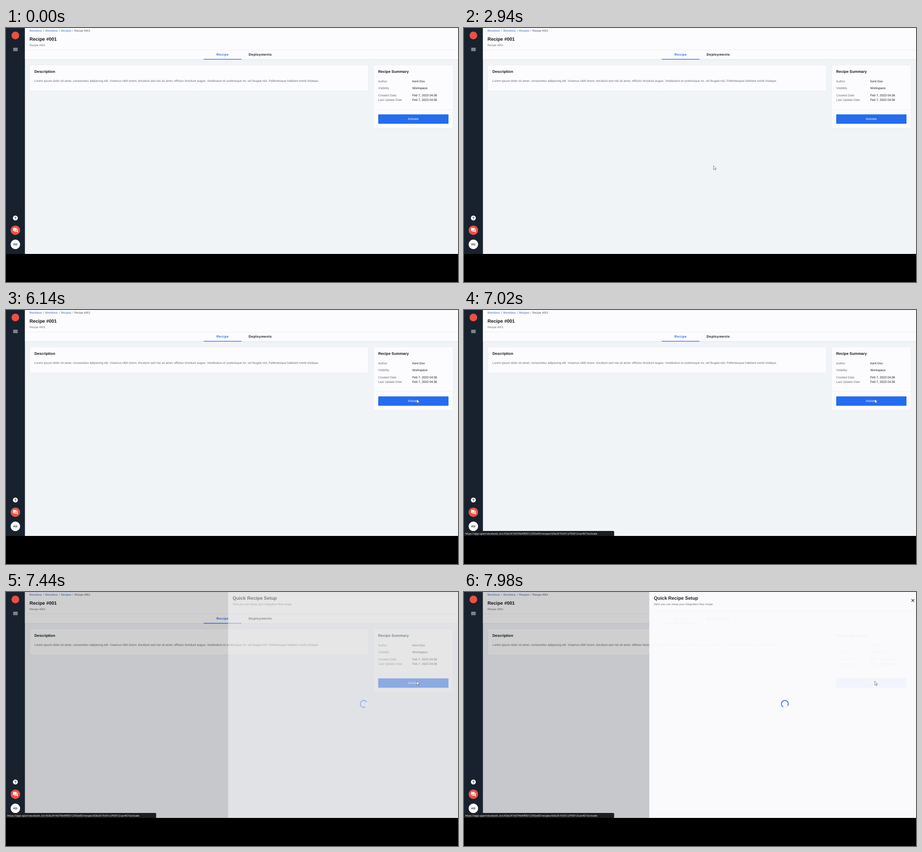
Animation, 998 px wide and 561 px high, one loop 8000 ms. Source, as an HTML page with a canvas:

```html
<!DOCTYPE html>
<html lang="en">
<head>
<meta charset="utf-8">
<title>Recipe activation</title>
<style>
html, body { margin: 0; width: 100%; height: 100%; overflow: hidden; background: #000; }
canvas { display: block; }
</style>
</head>
<body>
<canvas id="stage" width="998" height="561"></canvas>
<script>
const ctx = document.getElementById('stage').getContext('2d');
const LOOP = 8000;
const SANS = '"Liberation Sans", Arial, sans-serif';
const UI = '"Open Sans", "Noto Sans", sans-serif';
// The page is laid out in CSS pixels and shown at this scale.
const U = 0.52;
const BLUE = '#246df0', LINK = '#2d63d2', RED = '#ee4f43', INK = '#15171c', GREY = '#666a71';
const SIDE = '#18222f', CARD = '#fcfcfe';

const STATUS_AT = 6420, DRAWER_AT = 7275;
const URL_TEXT = 'https://app-sparrow.elastic.io/c/63e2419d74b49f0012392e05/recipes/63e261fc651a790012cac467/activate';
const LOREM = 'Lorem ipsum dolor sit amet, consectetur adipiscing elit. Vivamus nibh lorem, tincidunt sed nisi sit amet, ' +
  'efficitur tincidunt augue. Vestibulum et scelerisque mi, vel feugiat nisl. Pellentesque habitant morbi tristique.';

// Pointer keys: time, x, y
const POINTER = [
  [980, 2, 356], [1300, 260, 322], [1560, 430, 300], [1740, 469, 306], [2240, 551, 304],
  [2950, 551, 304], [3340, 700, 240], [3700, 799, 159], [4100, 650, 90], [4450, 537, 53],
  [4640, 540, 58], [4860, 800, 150], [5020, 899, 182], [5300, 909, 197], [5600, 914, 192],
  [5900, 899, 199], [6160, 907, 197]
];

const ARROW = new Path2D('M0 0V17L4 13L6.6 19L9 18L6.5 12.2H12Z');
const FORUM = new Path2D('M21 6h-2v9H6v2c0 .55.45 1 1 1h11l4 4V7c0-.55-.45-1-1-1z' +
  'M17 12V3c0-.55-.45-1-1-1H3c-.55 0-1 .45-1 1v14l4-4h10c.55 0 1-.45 1-1z');

const clamp = (v) => Math.min(1, Math.max(0, v));

function rect(x, y, w, h, color) {
  ctx.fillStyle = color;
  ctx.fillRect(x, y, w, h);
}

function circle(x, y, r, color) {
  ctx.fillStyle = color;
  ctx.beginPath();
  ctx.arc(x, y, r, 0, Math.PI * 2);
  ctx.fill();
}

function text(str, x, y, px, color, { bold = false, align = 'left', spacing = 0, family = SANS } = {}) {
  ctx.font = `${bold ? 'bold ' : ''}${px * U}px ${family}`;
  ctx.textRendering = 'geometricPrecision';
  ctx.letterSpacing = `${spacing * U}px`;
  ctx.textAlign = align;
  ctx.fillStyle = color;
  ctx.fillText(str, x, y);
}

function card(x, y, w, h) {
  ctx.beginPath();
  ctx.roundRect(x + 0.5, y + 0.5, w - 1, h - 1, 1.5);
  ctx.fillStyle = CARD;
  ctx.fill();
  ctx.strokeStyle = '#ebecf5';
  ctx.lineWidth = 1;
  ctx.stroke();
}

function drawHeader() {
  rect(41.5, 0, 956.5, 69.5, CARD);
  rect(41.5, 0, 956.5, 0.6, '#e9e9f0');
  rect(41.5, 48, 956.5, 0.8, '#e9ebef');
  rect(41.5, 69.3, 956.5, 0.9, '#dce0e5');
  [['Brendova', 52], ['Brendova', 87], ['Recipes', 121.5]].forEach(([s, x]) => text(s, x, 8.3, 12, LINK));
  [82.2, 117, 146.2].forEach((x) => text('/', x, 8.3, 12, GREY));
  text('Recipe #001', 151, 8.3, 12, '#4d5158');
  text('Recipe #001', 52, 28, 20, INK, { bold: true });
  text('Recipe #001', 52, 39.5, 12, GREY);
  text('Recipe', 464.8, 61.2, 14, BLUE, { bold: true, spacing: 1 });
  text('Deployments', 535.8, 61.2, 14, INK, { bold: true, spacing: 1 });
  rect(436.5, 68.4, 83.2, 1.3, BLUE);
}

function drawCards() {
  card(52, 81, 748.5, 58.5);
  text('Description', 62.8, 99.4, 16, INK, { bold: true });
  text(LOREM, 62.8, 119, 13, GREY);

  card(811, 81, 176.5, 141);
  text('Recipe Summary', 821.8, 99.4, 16, INK, { bold: true });
  const rows = [
    ['Author', 'Kent Dov', 119.5], ['Visibility', 'Workspace', 135.2],
    ['Created Date', 'Feb 7, 2023 04:36', 150.7], ['Last Update Date', 'Feb 7, 2023 04:36', 161.2]
  ];
  rows.forEach(([label, value, y]) => {
    text(label, 821.8, y, 13, GREY);
    text(value, 897, y, 13, INK);
  });
  rect(812, 179.8, 175, 0.8, '#e9ebef');
  ctx.fillStyle = BLUE;
  ctx.beginPath();
  ctx.roundRect(821.8, 190.7, 155.2, 20.8, 1);
  ctx.fill();
  text('Activate', 899.2, 203.4, 13, '#fff', { align: 'center' });
}

function drawSidebar() {
  rect(0, 0, 41.5, 499, SIDE);
  circle(20.7, 16.5, 8.5, RED);
  [44.2, 46.8, 49.4].forEach((y) => rect(15.8, y, 10, 1.1, '#fff'));
  circle(20.7, 419.6, 5.4, '#fff');
  text('?', 20.7, 422.6, 16, SIDE, { bold: true, align: 'center' });
  circle(20.7, 446.7, 10.5, RED);
  ctx.save();
  ctx.translate(14.5, 440.5);
  ctx.scale(U, U);
  ctx.fillStyle = '#fff';
  ctx.fill(FORUM);
  ctx.restore();
  circle(20.7, 477.8, 10.5, '#fff');
  text('KD', 20.7, 480.1, 12, '#22262d', { bold: true, align: 'center' });
}

function drawSpinner(x, y, t) {
  const gap = (15 + (t - 7440) * 0.11) * Math.PI / 180;
  ctx.lineWidth = 2;
  ctx.strokeStyle = '#eef2fb';
  ctx.beginPath();
  ctx.arc(x, y, 7.6, 0, Math.PI * 2);
  ctx.stroke();
  ctx.strokeStyle = '#3a70e4';
  ctx.beginPath();
  ctx.arc(x, y, 7.6, gap + 0.75, gap + Math.PI * 2 - 0.75);
  ctx.stroke();
}

function drawDrawer(t) {
  const mask = clamp((t - 7240) / 180);
  if (!mask) return;
  rect(41.5, 0, 956.5, 499, `rgba(0,0,0,${0.18 * mask})`);
  if (t < DRAWER_AT) return;

  const rest = Math.exp((DRAWER_AT - t) / 245);
  const x = 399 + 180 * rest;
  ctx.save();
  ctx.globalAlpha = 1 - rest;
  rect(x, 0, 998 - x, 499, '#fdfdff');
  rect(x, 41.5, 998 - x, 0.8, '#eeeff4');
  text('Quick Recipe Setup', x + 10.2, 17.3, 20, INK, { bold: true });
  text('Here you can setup your integration flow recipe', x + 10.2, 28.7, 12, GREY);
  drawSpinner(x + 299.3, 247.2, t);
  ctx.strokeStyle = INK;
  ctx.lineWidth = 1.2;
  ctx.beginPath();
  for (const s of [-1, 1]) {
    ctx.moveTo(x + 579, 18.7 - 3 * s);
    ctx.lineTo(x + 585, 18.7 + 3 * s);
  }
  ctx.stroke();
  ctx.restore();
}

function drawStatus(t) {
  if (t < STATUS_AT) return;
  ctx.fillStyle = '#1c1d21';
  ctx.beginPath();
  ctx.roundRect(0, 488, 331.5, 11, [0, 2, 0, 0]);
  ctx.fill();
  text(URL_TEXT, 2.4, 495.7, 5.9 / U, '#fff', { family: UI });
}

// Monotone cubic through the keys, so the pointer never overshoots them.
function slope(i, axis) {
  const p = POINTER;
  if (i === 0 || i === p.length - 1) return 0;
  const before = p[i][axis] - p[i - 1][axis], after = p[i + 1][axis] - p[i][axis];
  return before * after <= 0 ? 0 : (before + after) / (p[i + 1][0] - p[i - 1][0]);
}

function pointerAt(t, axis) {
  const p = POINTER, last = p.length - 1;
  if (t >= p[last][0]) return p[last][axis];
  const i = p.findIndex((k) => k[0] > t) - 1;
  const span = p[i + 1][0] - p[i][0], u = (t - p[i][0]) / span, v = 1 - u;
  return v * v * (1 + 2 * u) * p[i][axis] + u * u * (3 - 2 * u) * p[i + 1][axis] +
    span * u * v * (v * slope(i, axis) - u * slope(i + 1, axis));
}

function drawPointer(t) {
  if (t < POINTER[0][0]) return;
  ctx.save();
  ctx.translate(pointerAt(t, 1), pointerAt(t, 2));
  ctx.scale(U, U);
  ctx.fillStyle = '#fff';
  ctx.fill(ARROW);
  ctx.strokeStyle = '#3c3e44';
  ctx.lineWidth = 1.2;
  ctx.stroke(ARROW);
  ctx.restore();
}

function draw(t) {
  rect(0, 0, 998, 561, '#000');
  rect(41.5, 0, 956.5, 499, '#f1f4f7');
  drawHeader();
  drawCards();
  drawDrawer(t);
  drawSidebar();
  drawStatus(t);
  drawPointer(t);
}

const start = performance.now();
function tick() {
  draw((performance.now() - start) % LOOP);
  requestAnimationFrame(tick);
}
tick();
</script>
</body>
</html>
```
